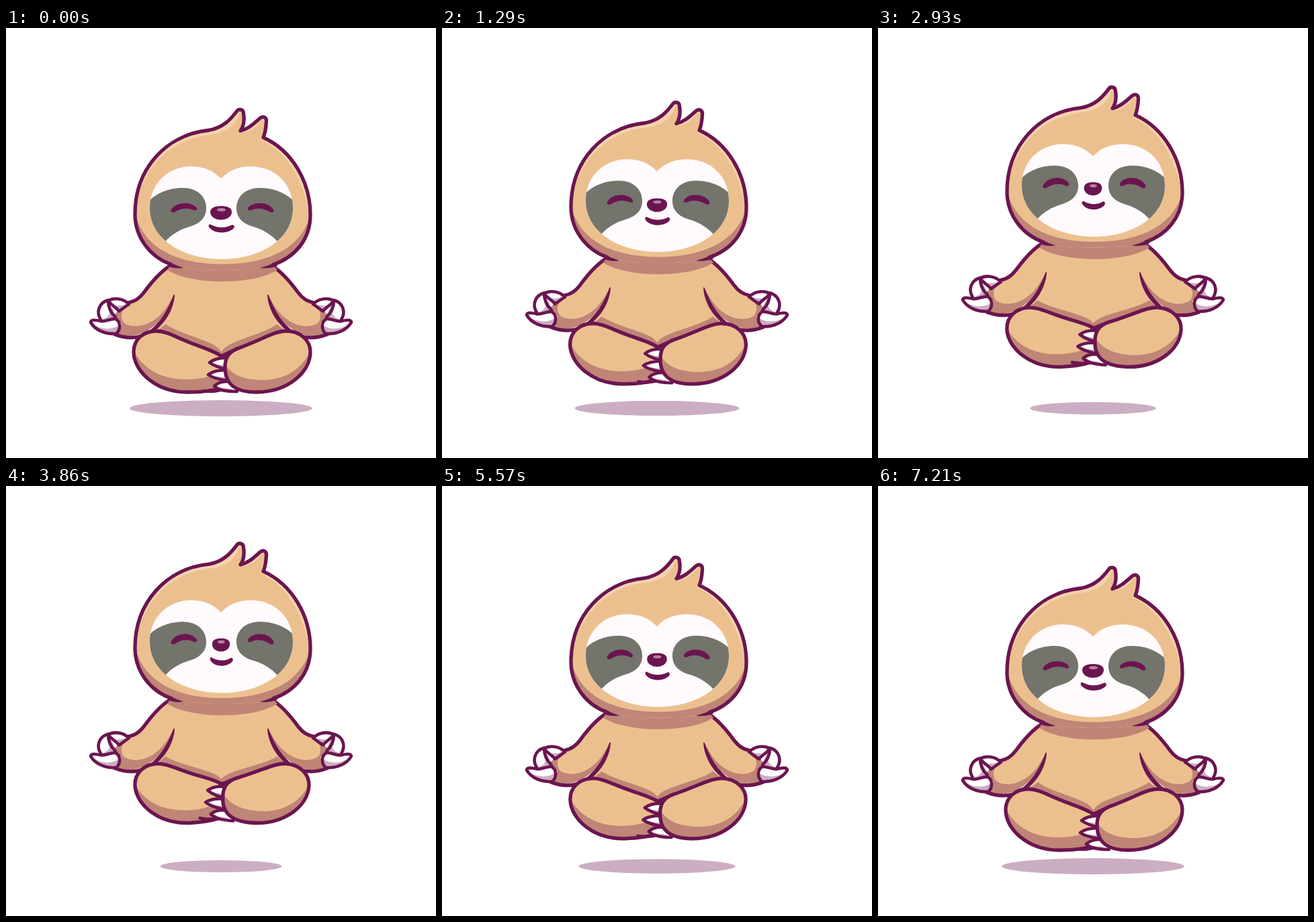
Recreate the animation shown at these times as an HTML page. Size 640x640 px, loop 7.37 s.

```html
<!DOCTYPE html>
<html lang="en">
<head>
<meta charset="utf-8">
<title>Floating meditation</title>
<style>
  html, body { margin: 0; width: 100%; height: 100%; overflow: hidden; background: #fff; }
  svg { display: block; width: 100vw; height: 100vh; }
  .fur { fill: #ecc08e; }
  .shade { fill: #bf8576; }
  .light { fill: #f4d3ad; }
  .ink { fill: #6b1550; }
  .line { fill: none; stroke: #6b1550; stroke-width: 5.3; stroke-linecap: round; stroke-linejoin: round; }
  .thin { stroke-width: 4.6; }
  .claw { fill: #fff; }
  .dusk { fill: #ccaec2; }
  .mask { fill: #fffafc; }
  .patch { fill: #73746b; }
</style>
</head>
<body>
<svg viewBox="0 0 640 640">
  <defs>
    <path id="headShape" d="M262 357C225 349 192 317 192 277C192 209 239 158 303 152C324 148 335 135 343 124.500C346 119.500 353 120.500 353.500 127C355 137 354 146 349 153C362 150 370 141 379 133.500C383 131 388 133 387.500 139C387 148 386 156 383 163C425 182 453 228 453 278C453 320 420 348 380 357Q321 363 262 357Z"/>
    <path id="maskShape" d="M320 224C305 209 290 206 274 206C240 207 214 232 214 268C214 315 265 344 321 344C378 344 427 315 427 268C427 232 401 207 366 206C350 206 335 209 320 224Z"/>
    <path id="armShape" d="M252 350C234 357 216 379 205 394C199 402 192 407 183 408.500L167 421L160 428L172 440L165 457C200 466 236 442 250 398Z"/>
    <path id="leftLegShape" d="M224 451C240 451 255 462 285 472.500C300 478 312 482 321 488.500L326 530C315 540 295 542 270 542C222 542 190 510 190 482C190 463 205 451 224 451Z"/>
    <path id="rightLegShape" d="M417 451C400 451 385 462 345 477C330 483 326 492 326 505C326 526 336 542 372 542C420 542 453 512 453 482C453 465 438 451 417 451Z"/>
    <clipPath id="headClip"><use href="#headShape"/></clipPath>
    <clipPath id="maskClip"><use href="#maskShape"/></clipPath>
    <clipPath id="armClip"><use href="#armShape"/></clipPath>
    <clipPath id="leftLegClip"><use href="#leftLegShape"/></clipPath>
    <clipPath id="rightLegClip"><use href="#rightLegShape"/></clipPath>

    <path id="lapShade" class="shade" d="M226 450L238 441C255 453 285 460 308 471C314 474 318 478 321 483V495L230 460Z"/>

    <g id="arm">
      <use href="#armShape" class="fur"/>
      <path class="shade" clip-path="url(#armClip)" d="M181 408C171 419 169 434 177 440C192 449 226 444 246 404L260 470H150V408Z"/>
      <path class="line" d="M252 350C234 357 216 379 205 394C199 402 192 407 183 408.500L168 421M162 456C180 463 199 462 215 453"/>
      <path class="ink" d="M251 397C250 418 237 442 214 456L211 452C230 439 240 421 249 398Q250 396 251 397Z"/>
      <path class="claw" d="M152 405C138 409 134 423 141 434C147 437 156 436 161 433C166 427 158 416 152 405Z"/>
      <path class="dusk" d="M154 411C158 425 152 432 142 434Q150 437 160 433C164 427 159 417 154 411Z"/>
      <path class="line thin" d="M152 405C138 409 134 423 141 434M152 406C152 415 156 424 161 428C164 431 164 435 162 436"/>
      <path class="claw" d="M152 406C160 401 174 402 183 411C178 414 173 419 168 421C163 415 158 414 152 406Z"/>
      <path class="dusk" d="M158 412C168 415 174 412 182 411L168 421Z"/>
      <path class="line thin" d="M152 406C160 401 174 402 183 411C178 414 173 419 168 421C163 415 158 414 152 406Z"/>
      <path class="claw" d="M126 438C127 433 135 435 142 436.500C150 437 156 432 163 433C171 437 171 449 164 455C148 456 133 450 126 438Z"/>
      <path class="dusk" d="M129 441C142 449 157 450 169 442L164 455C148 455 136 450 129 441Z"/>
      <path class="line thin" d="M126 438C127 433 135 435 142 436.500C150 437 156 432 163 433C171 437 171 449 164 455C148 456 133 450 126 438Z"/>
    </g>

    <path id="patchShape" class="patch" d="M204 270C215 248 240 238 263 238C286 238 298 252 298 268C298 283 288 291 274 295.500C258 300 245 308 235 320L200 330Z"/>
    <path id="eyeShape" class="ink" d="M246.500 269.500C253 259 276 257 284 268C285 272 281 272 278 270.500C268 267 259 269 251 274C246 275.500 244 272 246.500 269.500Z"/>
  </defs>

  <ellipse id="shadow" class="dusk" cx="320" cy="566"/>

  <path data-part="upper" class="fur" d="M245 352L225 400L222 450L320 488L418 450L415 400L397 352Z"/>
  <use data-part="left" href="#lapShade"/>
  <g data-part="right"><use href="#lapShade" transform="matrix(-1 0 0 1 641 0)"/></g>

  <g data-part="upper">
    <use href="#arm"/>
    <use href="#arm" transform="matrix(-1 0 0 1 640 0)"/>
    <path class="shade" d="M240 360C275 383 370 383 404 360L390 345H250Z"/>
  </g>

  <g data-part="left">
    <use href="#leftLegShape" class="fur"/>
    <path class="shade" clip-path="url(#leftLegClip)" d="M186 470C198 506 230 523 268 523C290 523 302 519 312 514L340 550H180Z"/>
    <path class="line" d="M321 488.500C312 482 300 478 285 472.500C255 462 240 451 224 451C205 451 190 463 190 482C190 510 222 542 270 542C290 542 302 541 314 537"/>
  </g>

  <g data-part="right">
    <path class="line" d="M345 477L321 488.500"/>
    <path class="line thin" d="M294 540C306 542 314 540 324 538"/>
    <g class="claw">
      <path d="M330 491C316 490 308 494 303 498C310 503 318 506 330 508Z"/>
      <path d="M330 509C314 509 306 512 301 516C308 521 316 523 330 525Z"/>
      <path d="M330 526C320 526 314 529 310 533C318 540 330 541 344 541Z"/>
    </g>
    <path class="dusk" d="M308 500L327 502V508Q315 505 308 500ZM306 518L327 520V525Q314 523 306 518ZM315 535L334 537L340 541Q325 542 315 535Z"/>
    <g class="line thin">
      <path d="M330 491C316 490 308 494 303 498C310 503 318 506 330 508"/>
      <path d="M330 509C314 509 306 512 301 516C308 521 316 523 330 525"/>
      <path d="M330 526C320 526 314 529 310 533C318 540 330 541 344 541"/>
    </g>
    <use href="#rightLegShape" class="fur"/>
    <path class="shade" clip-path="url(#rightLegClip)" d="M324 496C332 514 350 524 383 524C420 523 446 504 457 470L460 550H320Z"/>
    <use href="#rightLegShape" class="line"/>
  </g>

  <g data-part="upper">
    <g clip-path="url(#headClip)">
      <use href="#headShape" class="light"/>
      <path class="fur" d="M188 300C190 235 225 168 303 159C330 156 343 142 347 128L358 122L352 156C366 154 374 146 381 137L392 140L379 166C425 188 445 235 453 285V370H188Z"/>
      <path class="shade" d="M190 266C200 328 255 351.500 322 351.500C390 351.500 446 328 456 266V370H190Z"/>
    </g>
    <path class="line" d="M246 352C215 341 192 312 192 277C192 209 239 158 303 152C324 148 335 135 343 124.500C346 119.500 353 120.500 353.500 127C355 137 354 146 349 153C362 150 370 141 379 133.500C383 131 388 133 387.500 139C387 148 386 156 383 163C425 182 453 228 453 278C453 315 430 341 398 352"/>
    <path class="ink" d="M243 348C250 352 256 354 264 357C256 358 248 358 241 354ZM402 348C395 352 388 354 378 357C386 358 394 358 404 354Z"/>
    <use href="#maskShape" class="mask"/>
    <g clip-path="url(#maskClip)">
      <use href="#patchShape"/>
      <use href="#patchShape" transform="matrix(-1 0 0 1 641 0)"/>
    </g>
    <g id="eyes">
      <use href="#eyeShape"/>
      <use href="#eyeShape" transform="matrix(-1 0 0 1 644 0)"/>
    </g>
    <g id="nose">
      <path class="ink" d="M304 274C304 267 312 265 320 265C329 265 336 267 336 274C336 281 328 285.500 320 285.500C312 285.500 304 281 304 274Z"/>
      <ellipse cx="320.500" cy="270.500" rx="6.500" ry="2.400" fill="#b5829f"/>
    </g>
    <path id="mouth" class="ink" d="M304.500 292.500C315 298 327 298 336.500 293C340 292.500 341 296 338.500 298.500C330 306.500 311 306.500 303 297.500C300.500 294.500 302 291.500 304.500 292.500Z"/>
  </g>
</svg>
<script>
  const LOOP = 7370, RISE = 3580, STEP = 1000 / 14, LAST_STEP = 101;
  const byId = id => document.getElementById(id);
  const setAttr = (el, name, value) => el.setAttribute(name, value);
  const move = (part, value) =>
    document.querySelectorAll(`[data-part=${part}]`).forEach(el => setAttr(el, 'transform', value));

  // Scale around a fixed point, then shift vertically.
  const squash = (x, y, sx, sy, dy) =>
    `translate(${x} ${y + dy}) scale(${sx} ${sy}) translate(${-x} ${-y})`;

  // Eased height: 0 at rest, 1 at the top.
  function liftAt(time) {
    const s = Math.max(0, 1 - Math.abs(time / RISE - 1));
    return s * s * (3 - 2 * s);
  }

  function render(ms) {
    const step = Math.min(LAST_STEP, Math.floor((ms % LOOP + 6) / STEP));
    const p = liftAt(step * STEP);

    move('upper', `translate(0 ${-36.5 * p})`);
    move('left', `translate(0 ${-38.5 * p}) rotate(${-3.75 * p} 228 451)`);
    move('right', `translate(0 ${-38.5 * p}) rotate(${3.75 * p} 414 451)`);

    setAttr(byId('eyes'), 'transform', squash(322, 267, 1, 1 + 0.14 * p, -3.8 * p));
    setAttr(byId('nose'), 'transform', squash(320, 275, 1 - 0.18 * p, 1 - 0.05 * p, -2.8 * p));
    setAttr(byId('mouth'), 'transform', squash(320.5, 298, 1 - 0.11 * p, 1 + 0.05 * p, -1.2 * p));

    setAttr(byId('shadow'), 'rx', 136 - 46.3 * p);
    setAttr(byId('shadow'), 'ry', 12 - 3 * p);
  }

  const start = performance.now();
  function tick() {
    render(performance.now() - start);
    requestAnimationFrame(tick);
  }
  tick();
</script>
</body>
</html>
```
